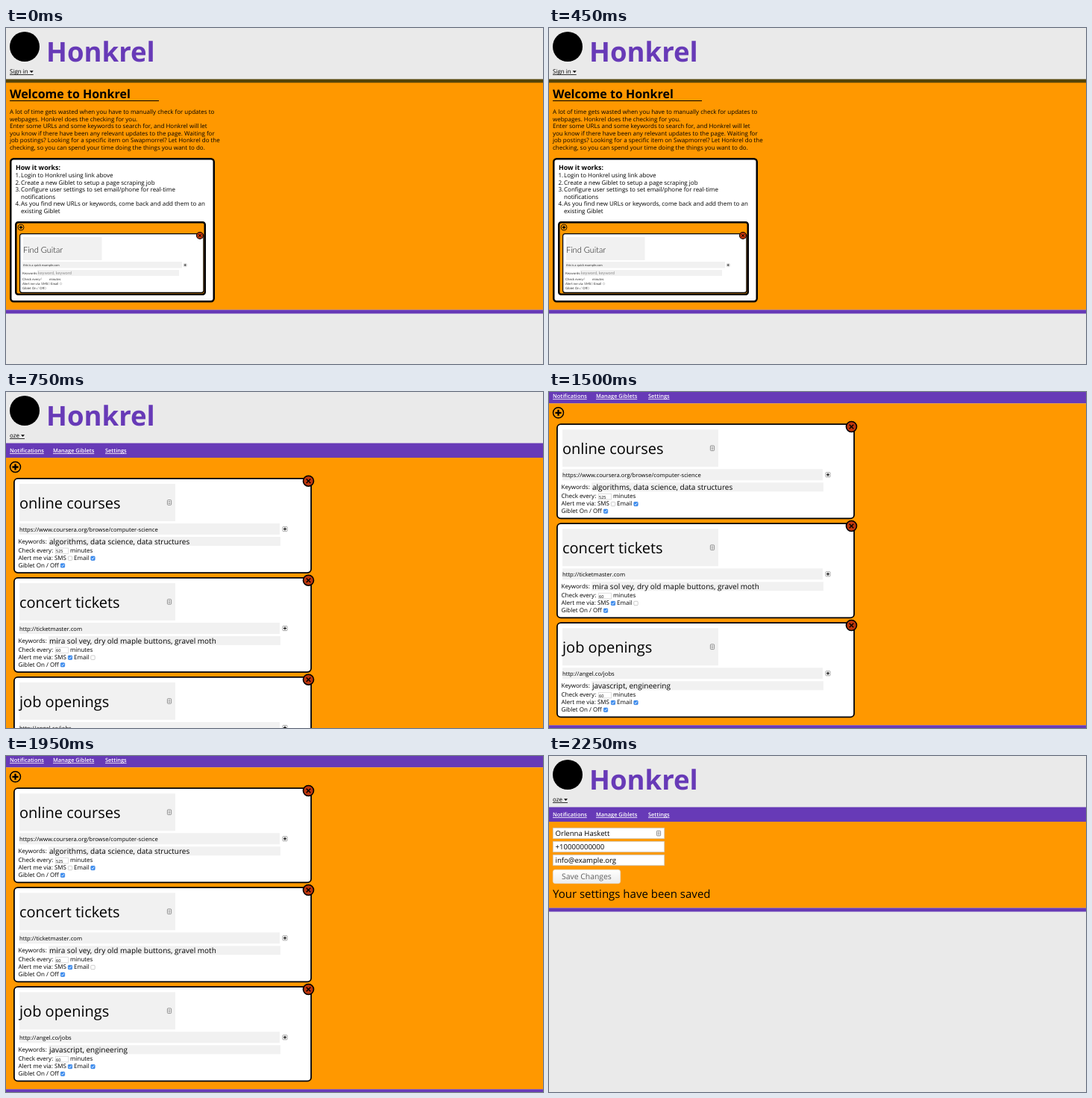
An HTML page with a canvas for the animation above (3 s loop, 720 by 450 pixels).

```html
<!DOCTYPE html>
<html lang="en">
<head>
<meta charset="utf-8">
<title>Honkrel</title>
<style>
  html, body { margin: 0; width: 100%; height: 100%; overflow: hidden; background: #eaeaea; }
  canvas { display: block; width: 720px; height: 450px; }
</style>
</head>
<body>
<canvas id="stage" width="720" height="450"></canvas>
<script>
const ctx = document.getElementById('stage').getContext('2d');
const W = 720, H = 450, SCENE_MS = 750, SCROLL = 72.7;
const GRAY = '#eaeaea', ORANGE = '#ff9800', PURPLE = '#673ab7', FIELD = '#f1f1f1', RED = '#bf360c';
const EDGE = '#a8a8a8';
const SANS = '"Open Sans", sans-serif', NARROW = 'Lato, sans-serif';

function rect(x, y, w, h, color) {
  ctx.fillStyle = color;
  ctx.fillRect(x, y, w, h);
}

// Rounded box whose border lies inside the given bounds.
function box(x, y, w, h, radius, fill, border, width) {
  ctx.beginPath();
  ctx.roundRect(x + width / 2, y + width / 2, w - width, h - width, radius);
  ctx.fillStyle = fill;
  ctx.fill();
  ctx.strokeStyle = border;
  ctx.lineWidth = width;
  ctx.stroke();
}

function text(str, x, y, size = 8, { color = '#000', weight = 400, family = SANS } = {}) {
  ctx.font = `${weight} ${size}px ${family}`;
  ctx.fillStyle = color;
  ctx.fillText(str, x, y);
  return ctx.measureText(str).width;
}

function lines(list, x, y, step) {
  list.forEach((line, i) => text(line, x, y + i * step));
}

function path(points, color, width) {
  ctx.beginPath();
  points.forEach(([x1, y1, x2, y2]) => { ctx.moveTo(x1, y1); ctx.lineTo(x2, y2); });
  ctx.strokeStyle = color;
  ctx.lineWidth = width;
  ctx.stroke();
}

function plus(x, y, r, width) {
  path([[x - r, y, x + r, y], [x, y - r, x, y + r]], '#000', width);
}

function disc(x, y, r, fill, width) {
  ctx.beginPath();
  ctx.arc(x, y, r, 0, Math.PI * 2);
  ctx.fillStyle = fill;
  ctx.fill();
  if (!width) return;
  ctx.strokeStyle = '#000';
  ctx.lineWidth = width;
  ctx.stroke();
}

function addButton(x, y, r) {
  disc(x, y, r, ORANGE, r * 0.21);
  plus(x, y, r * 0.58, r * 0.33);
}

function closeButton(x, y, r) {
  disc(x, y, r, RED, r * 0.23);
  const d = r * 0.4;
  path([[x - d, y - d, x + d, y + d], [x - d, y + d, x + d, y - d]], '#000', r * 0.2);
}

function checkbox(x, y, checked, size = 6) {
  box(x, y, size, size, 1, checked ? '#3b8cf0' : '#fff', checked ? '#2f7de0' : EDGE, 0.6);
  if (checked) {
    path([[x + 1.4, y + 3.1, x + 2.6, y + 4.4], [x + 2.5, y + 4.4, x + 4.7, y + 1.5]], '#fff', 0.9);
  }
}

function cardIcon(x, y) {
  box(x, y, 6, 7.5, 1, '#fafafa', '#777', 0.8);
  path([2.3, 3.8, 5.3].map(d => [x + 1.7, y + d, x + 4.3, y + d]), '#777', 0.7);
}

function header(account) {
  disc(25, 25, 20, '#000');
  text('Honkrel', 54, 45, 36.5, { color: PURPLE, weight: 700 });
  const end = 5 + text(account, 5, 61) + 2;
  ctx.beginPath();
  ctx.moveTo(end, 57.3);
  ctx.lineTo(end + 5, 57.3);
  ctx.lineTo(end + 2.5, 60);
  ctx.fill();
  rect(5, 62, end, 0.8, '#000');
}

function nav() {
  rect(0, 68.5, W, 19.5, PURPLE);
  [['Notifications', 5], ['Manage Giblets', 63], ['Settings', 133]].forEach(([label, x]) => {
    const width = text(label, x, 81, 7.4, { color: '#fff', weight: 600 });
    rect(x, 82, width, 0.8, '#fff');
  });
}

function content(top, bottom) {
  rect(0, top, W, bottom - top, ORANGE);
  rect(0, bottom, W, 5, PURPLE);
}

function preview() {
  const small = (str, x, y, size = 4.4, color = '#333') =>
    text(str, x, y, size, { color, family: NARROW });
  box(12, 259, 256, 99, 3, ORANGE, '#000', 2.5);
  addButton(20, 267, 4);
  box(18, 275, 247.5, 80, 3, '#fff', '#000', 1.2);
  closeButton(260, 278, 4.5);
  rect(23, 280, 105.5, 31, FIELD);
  text('Find Guitar', 23, 300.5, 11, { color: '#111', weight: 300, family: NARROW });
  rect(22, 313, 214, 8.5, FIELD);
  small('this is a quick example.com', 23, 319, 4.1);
  box(238, 315.3, 4.5, 4.5, 1, '#eee', EDGE, 0.5);
  plus(240.2, 317.5, 1.3, 0.7);
  small('Keywords:', 22, 329.5);
  rect(42, 324, 190, 8, FIELD);
  small('keyword, keyword', 43, 330, 5.6, '#888');
  small('Check every:', 22, 337.5);
  small('5', 46.5, 337.3, 3.2, '#888');
  small('minutes', 58, 337.5);
  small('Alert me via: SMS', 22, 344);
  checkbox(56, 341, false, 3);
  small('Email', 60, 344);
  checkbox(72, 341, false, 3);
  small('Giblet On / Off', 22, 350);
  checkbox(51, 347, false, 3);
}

function welcome() {
  header('Sign in');
  content(73, 377.5);
  rect(0, 68.5, W, 4.8, '#554408');
  text('Welcome to Honkrel', 5, 93.5, 16, { weight: 700 });
  rect(5, 97, 200, 1, '#000');
  lines([
    'A lot of time gets wasted when you have to manually check for updates to',
    'webpages. Honkrel does the checking for you.',
    'Enter some URLs and some keywords to search for, and Honkrel will let',
    'you know if there have been any relevant updates to the page. Waiting for',
    'job postings? Looking for a specific item on Swapmorrel? Let Honkrel do the',
    'checking, so you can spend your time doing the things you want to do.'
  ], 5, 115, 9.5);
  box(5, 174, 275, 193.5, 4, '#fff', '#000', 2.5);
  text('How it works:', 13, 190.3, 8.8, { weight: 700 });
  lines(['1.', '2.', '3.', '', '4.'], 12.5, 200, 9.5);
  lines([
    'Login to Honkrel using link above',
    'Create a new Giblet to setup a page scraping job',
    'Configure user settings to set email/phone for real-time',
    'notifications',
    'As you find new URLs or keywords, come back and add them to an',
    'existing Giblet'
  ], 20, 200, 9.5);
  preview();
}

const giblets = [
  { title: 'online courses', url: 'https://www.coursera.org/browse/computer-science',
    keywords: 'algorithms, data science, data structures', minutes: 525, sms: false, email: true },
  { title: 'concert tickets', url: 'http://ticketmaster.com',
    keywords: 'mira sol vey, dry old maple buttons, gravel moth', minutes: 60, sms: true, email: false },
  { title: 'job openings', url: 'http://angel.co/jobs',
    keywords: 'javascript, engineering', minutes: 60, sms: true, email: true }
];

function gibletCard(giblet, index) {
  ctx.save();
  ctx.translate(0, 115 + index * 133);
  box(10, 0, 400, 128, 5, '#fff', '#000', 1.8);
  closeButton(405.5, 4.2, 7);
  rect(18, 8, 209, 50, FIELD);
  text(giblet.title, 18, 41, 20);
  cardIcon(216, 29.2);
  rect(18, 61, 349, 15, FIELD);
  text(giblet.url, 18, 71.5, 7.65);
  box(370.5, 65, 7, 7, 1, '#eee', '#999', 0.7);
  plus(374, 68.5, 2, 1);
  text('Keywords:', 16.5, 88);
  rect(57, 79, 311, 12, FIELD);
  text(giblet.keywords, 58, 88.5, 10);
  text('Check every:', 16.5, 100);
  box(66, 93.7, 18, 8.3, 0, '#fff', '#ccc', 0.7);
  text(giblet.minutes, 67, 100.3, 5.5);
  text('minutes', 86, 100);
  text('Alert me via: SMS', 16.5, 110);
  checkbox(83, 104.7, giblet.sms);
  text('Email', 91, 110);
  checkbox(113.5, 104.7, giblet.email);
  text('Giblet On / Off', 16.5, 119.6);
  checkbox(73, 114.4, true);
  ctx.restore();
}

function gibletPage(scroll) {
  ctx.save();
  ctx.translate(0, -scroll);
  header('oze');
  nav();
  content(88, 519);
  addButton(12.5, 100.5, 7);
  giblets.forEach(gibletCard);
  ctx.restore();
}

function settings() {
  header('oze');
  nav();
  content(88, 203.5);
  ['Orlenna Haskett', '+10000000000', 'info@example.org'].forEach((value, i) => {
    box(5, 96 + i * 18, 150, 15, 0, '#fff', '#ccc', 0.8);
    text(value, 8.5, 107 + i * 18, 9.6);
  });
  cardIcon(144, 99.8);
  const shade = ctx.createLinearGradient(0, 152, 0, 171);
  shade.addColorStop(0, '#fff');
  shade.addColorStop(1, '#ececec');
  box(5, 152, 91, 19, 3, shade, '#ddd', 0.7);
  text('Save Changes', 17, 165, 10.4, { color: '#606060' });
  text('Your settings have been saved', 5, 190, 15);
}

const scenes = [welcome, () => gibletPage(0), () => gibletPage(SCROLL), settings];

function draw() {
  const scene = Math.floor(performance.now() / SCENE_MS) % scenes.length;
  ctx.textRendering = 'geometricPrecision';
  rect(0, 0, W, H, GRAY);
  scenes[scene]();
  requestAnimationFrame(draw);
}
draw();
</script>
</body>
</html>
```
